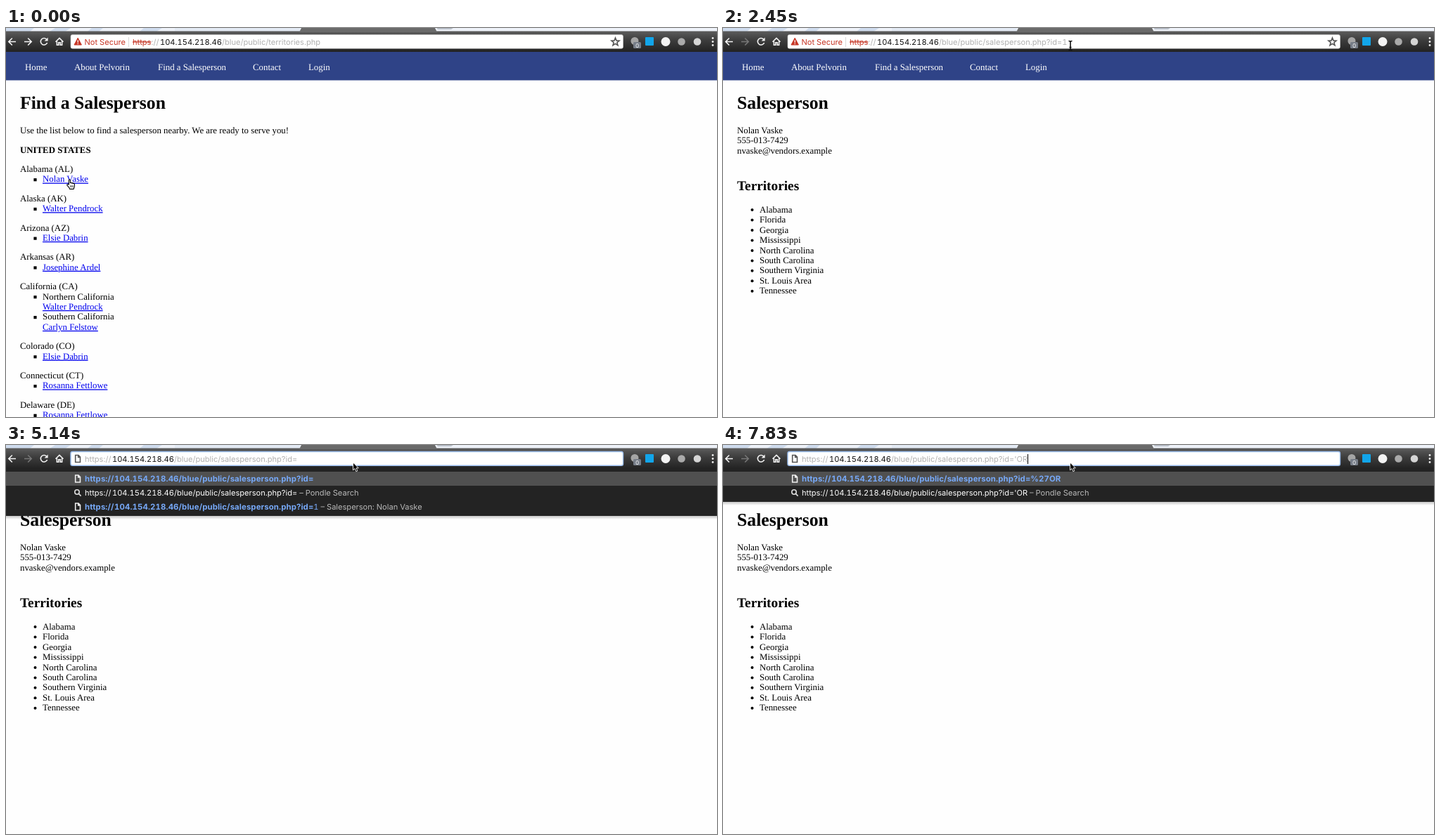
These frames come from a looping animation (1011 by 554 pixels, 8 s). An HTML page:

```html
<!DOCTYPE html>
<html lang="en">
<head>
<meta charset="utf-8">
<title>Territory lookup</title>
<style>
  html, body { margin: 0; width: 100%; height: 100%; overflow: hidden; background: #fff; }
  svg { display: block; width: 1011px; height: 554px; }
  text { white-space: pre; text-rendering: geometricPrecision; }
  .page { font: 12.85px "Liberation Serif", "Times New Roman", serif; }
  .ui { font: 11.08px Inter, Roboto, sans-serif; font-feature-settings: "tnum"; }
  .link { fill: #0000ee; text-decoration: underline; text-decoration-skip-ink: none; }
  .h1 { font-size: 25.7px; font-weight: 700; }
  .h2 { font-size: 19.3px; font-weight: 700; }
  .bold { font-weight: 700; }
  .match { font-size: 11.4px; font-weight: 700; letter-spacing: .1px; }
  .plain { font-size: 11.08px; font-weight: 400; letter-spacing: 0; }
  .strike { text-decoration: line-through; }
  .line { fill: none; stroke-width: 1.6; }
</style>
</head>
<body>
<svg id="stage" viewBox="0 0 1011 554" xmlns="http://www.w3.org/2000/svg">
  <defs>
    <linearGradient id="bar" x2="0" y2="1">
      <stop offset="0" stop-color="#5c5c5c"/>
      <stop offset=".45" stop-color="#3c3c3c"/>
      <stop offset="1" stop-color="#222"/>
    </linearGradient>
    <linearGradient id="shade" x2="0" y2="1">
      <stop offset="0" stop-color="#000" stop-opacity=".22"/>
      <stop offset="1" stop-color="#000" stop-opacity="0"/>
    </linearGradient>
  </defs>
</svg>
<script>
const LOOP = 8000;
const STEP = 14.46;
const stage = document.getElementById("stage");

function add(parent, tag, attrs = {}, content) {
  const node = document.createElementNS("http://www.w3.org/2000/svg", tag);
  for (const key in attrs) node.setAttribute(key, attrs[key]);
  if (content !== undefined) node.textContent = content;
  parent.appendChild(node);
  return node;
}
const group = (parent, attrs) => add(parent, "g", attrs);
const rect = (parent, x, y, width, height, fill, rx = 0) =>
  add(parent, "rect", { x, y, width, height, fill, rx });
const circle = (parent, cx, cy, r, fill) => add(parent, "circle", { cx, cy, r, fill });
const path = (parent, d, attrs) => add(parent, "path", { d, ...attrs });
const text = (parent, x, y, content, attrs = {}) => add(parent, "text", { x, y, ...attrs }, content);
const span = (parent, content, attrs) => add(parent, "tspan", attrs, content);
const show = (node, on) => node.setAttribute("display", on ? "inline" : "none");
const place = (node, x, y) => node.setAttribute("transform", `translate(${x} ${y})`);

// Latest value of a list of [time, value] pairs
const at = (track, t) => track.reduce((value, [time, next]) => (t >= time ? next : value), track[0][1]);

// ---- Web pages
rect(stage, 0, 0, 1011, 554, "#fefefe");
const listPage = group(stage, { class: "page" });
const personPage = group(stage, { class: "page" });

const walter = "Walter Pendrock", elsie = "Elsie Dabrin", rosanna = "Rosanna Fettlowe";
const territories = [
  ["Alabama (AL)", "Nolan Vaske"],
  ["Alaska (AK)", walter],
  ["Arizona (AZ)", elsie],
  ["Arkansas (AR)", "Josephine Ardel"],
  ["California (CA)", ["Northern California", walter], ["Southern California", "Carlyn Felstow"]],
  ["Colorado (CO)", elsie],
  ["Connecticut (CT)", rosanna],
  ["Delaware (DE)", rosanna]
];

text(listPage, 20, 115, "Find a Salesperson", { class: "h1" });
text(listPage, 20, 150, "Use the list below to find a salesperson nearby. We are ready to serve you!");
text(listPage, 20, 177.5, "UNITED STATES", { class: "bold" });
let rowY = 205;
for (const [state, ...entries] of territories) {
  text(listPage, 20, rowY, state);
  for (const entry of entries) {
    rowY += STEP;
    rect(listPage, 39.4, rowY - 5.4, 4.2, 4.2, "#000");
    if (Array.isArray(entry)) {
      text(listPage, 52, rowY, entry[0]);
      rowY += STEP;
    }
    text(listPage, 52, rowY, [].concat(entry).pop(), { class: "link" });
  }
  rowY += 27.3;
}

text(personPage, 20, 115, "Salesperson", { class: "h1" });
["Nolan Vaske", "555-013-7429", "nvaske@vendors.example"].forEach((line, i) =>
  text(personPage, 20, 150 + i * STEP, line));
text(personPage, 20, 230.5, "Territories", { class: "h2" });
["Alabama", "Florida", "Georgia", "Mississippi", "North Carolina", "South Carolina",
  "Southern Virginia", "St. Louis Area", "Tennessee"].forEach((name, i) => {
  const y = 262.7 + i * STEP;
  circle(personPage, 41.5, y - 3.6, 2, "#000");
  text(personPage, 52, y, name);
});

const nav = group(stage, { class: "page", fill: "#fff" });
rect(nav, 0, 34, 1011, 40.5, "#2f4387");
[[27, "Home"], [97, "About Pelvorin"], [216, "Find a Salesperson"], [351, "Contact"], [430, "Login"]]
  .forEach(([x, label]) => text(nav, x, 60, label));

// ---- Browser chrome
const chrome = group(stage, { class: "ui" });
rect(chrome, 0, 0, 1011, 6, "#eef2f9");
path(chrome, "M0 0H40L34 5H0ZM70 0H92L84 5H62ZM122 0H138L132 5H116ZM196 0H222L214 5H190Z", { fill: "#cfdcee" });
rect(chrome, 240, 0, 178, 5, "#e3eaf4");
path(chrome, "M612 0H636L633 2H614Z", { fill: "#b9bfc8" });
rect(chrome, 0, 4.5, 1011, 29.5, "url(#bar)");
path(chrome, "M417 6L420 0H610L613 6Z", { fill: "#6a6a6a" });

const white = { class: "line", stroke: "#f4f4f4" };
path(chrome, "M14 19.5H4M8.8 14.5L3.8 19.5L8.8 24.5", white);
const forward = path(chrome, "M26 19.5H36M31.2 14.5L36.2 19.5L31.2 24.5", white);
const reload = group(chrome);
path(reload, "M58 16.4A4.8 4.8 0 1 0 58.6 21", white);
path(reload, "M59.6 13.6V18.6H54.6Z", { fill: "#f4f4f4" });
const stop = path(chrome, "M49.5 15L58.5 24M58.5 15L49.5 24", white);
path(chrome, "M70.5 19.8L76 14.4L81.5 19.8M72.4 18.8V24.3H74.8V20.8H77.2V24.3H79.6V18.8",
  { ...white, "stroke-width": 1.3 });

const box = rect(chrome, 92, 9.5, 785.5, 19.7, "#fff", 2.5);
const selection = rect(chrome, 180, 12, 307, 15, "#b3d6fd");

circle(chrome, 894, 18.5, 5.5, "#a5a5a5");
rect(chrome, 892, 20, 11, 9, "#767d88", 1.5);
text(chrome, 895, 27.5, "0", { fill: "#fff", "font-size": 8 });
rect(chrome, 909, 13, 12, 12, "#12a5ea", 1);
circle(chrome, 938, 19.5, 6.5, "#f3f3f3");
circle(chrome, 960.5, 19.5, 5.3, "#aaa");
circle(chrome, 983, 19.5, 5.3, "#d5d5d5");
[14.5, 19.5, 24.5].forEach(y => circle(chrome, 1005, y, 1.4, "#eee"));

const docIcon = (parent, y, stroke) =>
  path(parent, `M98.7 ${y - 5}H103L105.5 ${y - 2.5}V${y + 5}H98.7ZM102.7 ${y - 5}V${y - 2}H105.5`,
    { class: "line", stroke, "stroke-width": 1 });

const HOST = "104.154.218.46";
const FOLDER = "/blue/public/";
const SCRIPT = "salesperson.php";
const FAINT = "#b0b0b0", RED = "#c63626", INK = "#111", BLUE = "#77a9f8", GRAY = "#b8b8b8";

// One line of address; returns its path and query spans
function address(parent, y, hostX, hostFill, attrs) {
  const line = text(parent, 112, y, "", attrs);
  span(line, "https://");
  span(line, HOST, { x: hostX, fill: hostFill });
  return { line, path: span(line, FOLDER + SCRIPT), query: span(line, "") };
}

// Address bar, at rest and while editing
const resting = group(chrome);
path(resting, "M866.5 14L868 17.9L872 18.1L868.9 20.7L870 24.7L866.5 22.4L863 24.7L864.1 20.7L861 18.1L865 17.9Z",
  { class: "line", stroke: "#555", "stroke-width": 1.1 });
path(resting, "M102.2 14.2L107.4 24H97Z", { fill: RED, stroke: RED, "stroke-linejoin": "round" });
rect(resting, 101.6, 17.2, 1.3, 3.6, "#fff");
rect(resting, 101.6, 21.8, 1.3, 1.3, "#fff");
text(resting, 111.5, 23.7, "Not Secure", { fill: RED });
rect(resting, 174, 13, 1, 14, "#d9d9d9");
text(resting, 180, 23.7, "https", { fill: RED, class: "strike" });
text(resting, 206.5, 23.7, "://", { fill: FAINT });
const restLine = text(resting, 219, 23.7, "", { fill: FAINT });
span(restLine, HOST, { fill: INK });
const restPath = span(restLine, "");
const restQuery = span(restLine, "");

const editing = group(chrome);
docIcon(editing, 19.5, "#555");
const edited = address(editing, 23.7, 151, INK, { fill: FAINT });
const caret = rect(chrome, 0, 13, 1, 14, "#000");

// Suggestions
const menu = group(stage, { class: "ui" });
const menuShade = rect(menu, 0, 0, 1011, 5, "url(#shade)");
const menuBack = rect(menu, 0, 34, 1011, 0, "#232323");
rect(menu, 0, 38, 1011, 20, "#505050");
docIcon(menu, 48, "#eee");
const match = { fill: BLUE, class: "match" };
const top1 = address(menu, 52, 154, BLUE, match);
add(menu, "circle", { cx: 101, cy: 67, r: 3.2, class: "line", stroke: "#ddd", "stroke-width": 1.4 });
path(menu, "M103.4 69.4L106.6 72.6", { class: "line", stroke: "#ddd" });
const search = address(menu, 72, 151, "#fff", { fill: "#fff" });
span(search.line, " – Pondle Search", { fill: GRAY });
const history = group(menu);
docIcon(history, 88, "#eee");
const visited = address(history, 92, 154, BLUE, match);
visited.query.textContent = "?id=";
span(visited.line, "1", { class: "plain" });
span(visited.line, " – Salesperson: Nolan Vaske", { class: "plain", fill: GRAY });

// ---- Pointers
const pointers = { hand: group(stage), beam: group(stage), arrow: group(stage) };
path(pointers.hand, "M3.4 8V1.6Q4.4 0 5.4 1.6V5.5Q6.6 4.7 7.3 5.9Q8.6 5.2 9.3 6.4Q11.2 5.8 11.4 7.6V10.5L10.2 14.4H4.6L3.8 12.4L.8 8.8Q.7 7 2.2 7.4Z",
  { fill: "#fff", stroke: "#000", "stroke-width": 1.1, "stroke-linejoin": "round" });
path(pointers.hand, "M5.6 9V12M7.4 9V12M9.2 9V12", { stroke: "#000", "stroke-width": .7 });
path(pointers.beam, "M-2.5 -6.5Q0 -6.5 0 -5V5Q0 6.5 -2.5 6.5M2.5 -6.5Q0 -6.5 0 -5M0 5Q0 6.5 2.5 6.5M-1.5 2.5H1.5",
  { class: "line", stroke: "#111", "stroke-width": 1.1 });
path(pointers.arrow, "M.5 .5V11.3L3 9L4.8 13.2L6.8 12.3L5 8.3H8.3Z",
  { fill: "#000", stroke: "#fff", "stroke-width": .9 });

// ---- Timeline
const LOADED = 1840, FOCUS = 2750, EDIT = 3490, QUOTE = 5580;
const queries = [[0, ""], [1540, "?id=1"], [EDIT, "?id="], [QUOTE, "?id='"], [6180, "?id='O"], [6480, "?id='OR"]];
const carets = [[0, 0], [3200, 486], [EDIT, 411], [3940, 0], [4540, 411], [5140, 0], [QUOTE, 414],
  [6030, 0], [6180, 423], [6480, 430], [7080, 0], [7530, 430], [7830, 433]];
const poses = [[0, ["hand", 86, 215]], [140, ["beam", 92, 206]], [650, ["hand", 85, 216]],
  [800, ["hand", 84, 217]], [2450, ["beam", 494, 25]], [FOCUS, ["arrow", 493, 24.5]]];

function pose(t) {
  if (t < LOADED || t >= 2450) return at(poses, t);
  const k = (Math.floor((t - LOADED) / 150) + 1) / 5;
  const eased = k * k * (3 - 2 * k);
  return ["arrow", 89 + 404 * eased, 218 - 193 * eased];
}

function render(t) {
  const query = at(queries, t);
  const loading = t >= 1100 && t < LOADED;
  const isEditing = t >= EDIT;

  show(listPage, t < LOADED);
  show(personPage, t >= LOADED);
  show(reload, !loading);
  show(stop, loading);
  forward.setAttribute("stroke", t < 1540 ? "#f4f4f4" : "#777");

  box.setAttribute("stroke", t < FOCUS ? "#c8c8c8" : "#9dbff0");
  box.setAttribute("stroke-width", t < FOCUS ? .6 : 1.4);
  show(selection, t >= FOCUS && t < 3200);
  show(resting, !isEditing);
  show(editing, isEditing);
  restPath.textContent = FOLDER + (query ? SCRIPT : "territories.php");
  restQuery.textContent = query;
  edited.query.textContent = query;
  const caretX = at(carets, t);
  show(caret, caretX > 0);
  caret.setAttribute("x", caretX);

  show(menu, isEditing);
  const bottom = t < QUOTE ? 101 : 81;
  menuBack.setAttribute("height", bottom - 34);
  menuShade.setAttribute("y", bottom);
  show(history, t < QUOTE);
  top1.query.textContent = query.replace("'", "%27");
  search.query.textContent = query;

  const [kind, x, y] = pose(t);
  for (const name in pointers) show(pointers[name], name === kind);
  place(pointers[kind], x, y);
}

const start = performance.now();
function tick() {
  render((performance.now() - start) % LOOP);
  requestAnimationFrame(tick);
}
tick();
</script>
</body>
</html>
```
